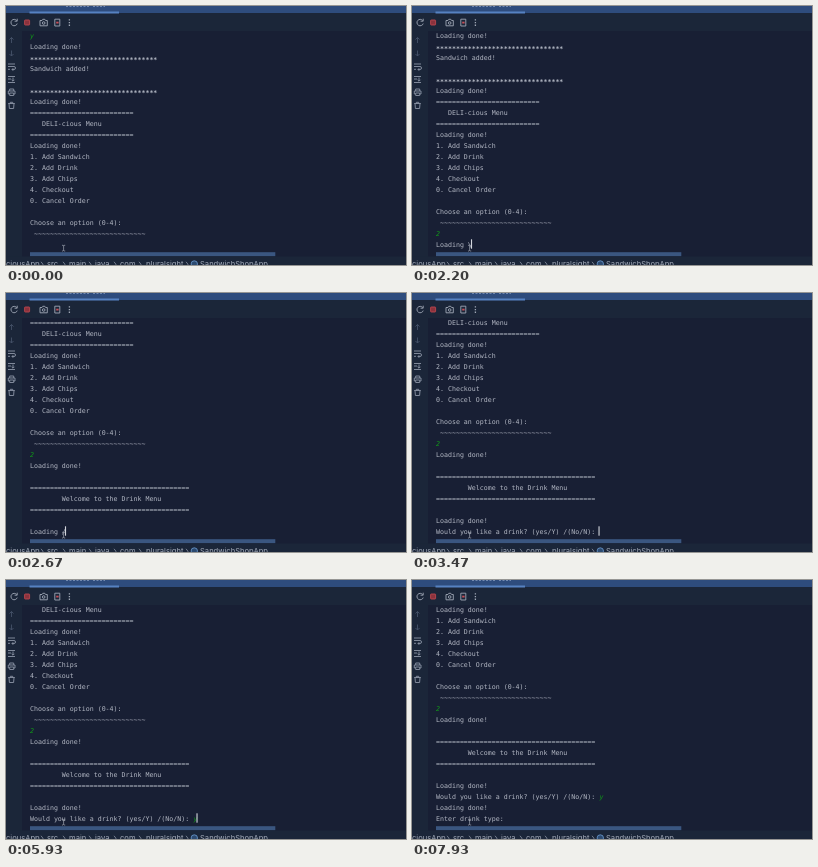
These frames come from a looping animation (400x259 px, 8 s). An HTML page:

```html
<!DOCTYPE html>
<html lang="en">
<head>
<meta charset="utf-8">
<title>Console session</title>
<style>
  html, body { margin: 0; width: 100%; height: 100%; overflow: hidden; background: #181f34; }
  svg { display: block; width: 100vw; height: 100vh; }
  #console text { font: 6.62px "DejaVu Sans Mono", "Noto Sans Mono", monospace; fill: #b3b8c4; white-space: pre; }
  #console .typed { fill: #109a18; font-style: italic; }
  #console .stars { font-weight: bold; }
  #crumbs text { font: 7.6px Inter, "Open Sans", sans-serif; fill: #a3abba; }
  .icon { fill: none; stroke: #a0a8b6; stroke-width: .9; }
  .side { stroke: #8c95a5; }
  .side .dim { stroke: #465268; }
  .chevron { fill: none; stroke: #8c95a5; stroke-width: .8; }
</style>
</head>
<body>
<svg viewBox="0 0 400 259" preserveAspectRatio="none">
  <defs>
    <clipPath id="view"><rect x="16" y="25.5" width="384" height="221"/></clipPath>
  </defs>
  <rect width="400" height="259" fill="#181f34"/>

  <!-- tab strip and toolbar -->
  <rect width="400" height="7" fill="#2e4c7d"/>
  <rect x="23.5" y="5.5" width="89.5" height="2" fill="#5682c2"/>
  <path d="M60 .4H83M87 .4H99" stroke="#8fa3c4" stroke-width=".8" stroke-dasharray="2 1.5"/>
  <rect y="7" width="400" height="18" fill="#1b2639"/>
  <rect x="23.5" y="7" width="89.5" height=".5" fill="#5682c2"/>
  <g class="icon">
    <path d="M10.7 14.6A3.2 3.2 0 1 0 11.2 17.6M11.2 12.7V15.2H8.6"/>
    <rect x="18.6" y="14" width="5" height="5" rx=".6" fill="#8a323d" stroke="#b9474f"/>
    <path d="M34 14.5H36L36.8 13.3H38.8L39.6 14.5H41.3V19.8H34Z"/>
    <circle cx="37.7" cy="17" r="1.3"/>
    <path d="M48.8 13.2H53.8V20H48.8Z"/>
    <path d="M50.2 16.6H52.6" stroke="#c94f58" stroke-width="1.8"/>
    <path d="M63.4 13.2V20" stroke-width="1.3" stroke-dasharray="1.4 1.3"/>
  </g>

  <!-- side buttons -->
  <rect y="25" width="16" height="226" fill="#1b2639"/>
  <g class="icon side">
    <path class="dim" d="M5.5 37V31.5M3.5 33.5L5.5 31.5L7.5 33.5"/>
    <path class="dim" d="M5.5 44.5V50M3.5 48L5.5 50L7.5 48"/>
    <path d="M2 58H9M2 60.5H8Q9.5 60.5 9.5 62T8 63.5H6M7.2 62.2L6 63.5L7.2 64.8M2 63.3H4"/>
    <path d="M2 70.5H9M2 73H5M2 76.5H9M7 71.5V75M5.6 73.8L7 75.2L8.4 73.8"/>
    <path d="M3.7 85V83H7.7V85M3.5 88H2.3V85H9V88H7.8M3.7 87H7.7V89.5H3.7Z"/>
    <path d="M2.2 97.5H8.8M4.3 97.5V96.3H6.7V97.5M3 97.5L3.4 102.5H7.6L8 97.5"/>
  </g>

  <g id="console" clip-path="url(#view)">
    <g id="lines"></g>
    <rect id="caret" y="233.3" width="1.1" height="9.4" fill="#d3d6dd"/>
  </g>
  <path d="M56 239.3H57.1L57.6 239.8L58.1 239.3H59.2M57.6 239.6V244.6M56 245H57.1L57.6 244.5L58.1 245H59.2"
        fill="none" stroke="#a3a8b4" stroke-width=".7"/>

  <rect x="24" y="246.2" width="245.3" height="4" fill="#3a5680"/>
  <rect y="250.5" width="400" height="8.5" fill="#1b2639"/>
  <g id="crumbs">
    <path id="chevrons" class="chevron"/>
    <circle cx="188.3" cy="258" r="3.2" fill="#2c4a70" stroke="#6d9bd0" stroke-width=".8"/>
  </g>
</svg>
<script>
const LOOP = 8000, LEFT = 24, BASE = 241.4, PITCH = 11, CHAR = 3.985;
const PROMPT = "Would you like a drink? (yes/Y) /(No/N): ";
const DONE = "Loading done!";
const STARS = "*".repeat(32);
const svgNS = "http://www.w3.org/2000/svg";
const $ = id => document.getElementById(id);

function addText(parent, x, y, content, className) {
  const node = document.createElementNS(svgNS, "text");
  node.setAttribute("x", x);
  node.setAttribute("y", y);
  if (className) node.setAttribute("class", className);
  node.textContent = content;
  parent.append(node);
  return node;
}

// Value of the latest [time, value] step that has started.
const at = (steps, t) => steps.reduce((value, [start, next]) => t >= start ? next : value, "");

const loading = steps => t => at(steps.map(([start, mark]) =>
  [start, mark === "done" ? DONE : "Loading " + mark]), t);
const typed = (start, key) => t => t >= start ? key : "";

const choice = typed(1130, "2");
const answer = typed(5870, "y");
const lines = [
  typed(0, "y"), DONE, STARS, "Sandwich added!", "", STARS, DONE,
  "=".repeat(26), "   DELI-cious Menu", "=".repeat(26), DONE,
  "1. Add Sandwich", "2. Add Drink", "3. Add Chips", "4. Checkout", "0. Cancel Order",
  "", "Choose an option (0-4):", " " + "~".repeat(28),
  choice,
  loading([[1470, "|"], [2000, "-"], [2200, "\\"], [2400, "done"]]),
  "", "=".repeat(40), "        Welcome to the Drink Menu", "=".repeat(40), "",
  loading([[2400, ""], [2470, "|"], [2670, "/"], [2870, "-"], [3070, "\\"], [3470, "done"]]),
  PROMPT,
  loading([[6070, "|"], [6600, "/"], [6800, "-"], [7000, "\\"], [7200, "done"]]),
  "Enter drink type: "
];
const lastLine = [[0, 19], [1470, 20], [2400, 26], [3470, 27], [6070, 28], [7200, 29]];
const caretOn = [[0, false], [330, true], [1000, false], [1130, true], [3930, false],
  [4670, true], [5000, false], [5670, true], [7730, false]];
const answerLine = lines.indexOf(PROMPT);

const textAt = (i, t) => typeof lines[i] === "function" ? lines[i](t) : lines[i];
const nodes = lines.map((line, i) => {
  const isStars = line === STARS;
  const isTyped = i === 0 || line === choice;
  return addText($("lines"), LEFT, BASE + i * PITCH + (isStars ? 1.6 : 0), "",
    isStars ? "stars" : isTyped ? "typed" : "");
});
const answerNode = addText($("lines"), LEFT + PROMPT.length * CHAR,
  BASE + answerLine * PITCH, "", "typed");

[[0, "ciousApp"], [41, "src"], [63, "main"], [89, "java"], [114, "com"],
 [140, "pluralsight"], [194, "SandwichShopApp"]].forEach(([x, name]) =>
  addText($("crumbs"), x, 261.2, name));
$("chevrons").setAttribute("d", [35, 57, 83, 108, 133, 180]
  .map(x => `M${x} 255.8l2 2.5l-2 2.5`).join(""));

function render(t) {
  const last = at(lastLine, t);
  nodes.forEach((node, i) => {
    const content = i <= last ? textAt(i, t) : "";
    if (node.textContent !== content) node.textContent = content;
  });
  answerNode.textContent = answer(t);
  $("lines").setAttribute("transform", `translate(0 ${-last * PITCH})`);

  const column = textAt(last, t).length + (last === answerLine ? answer(t).length : 0);
  $("caret").setAttribute("x", LEFT + column * CHAR - 0.9);
  $("caret").setAttribute("visibility", at(caretOn, t) ? "visible" : "hidden");
}

const started = performance.now();
function tick() {
  render((performance.now() - started) % LOOP);
  requestAnimationFrame(tick);
}
tick();
</script>
</body>
</html>
```
